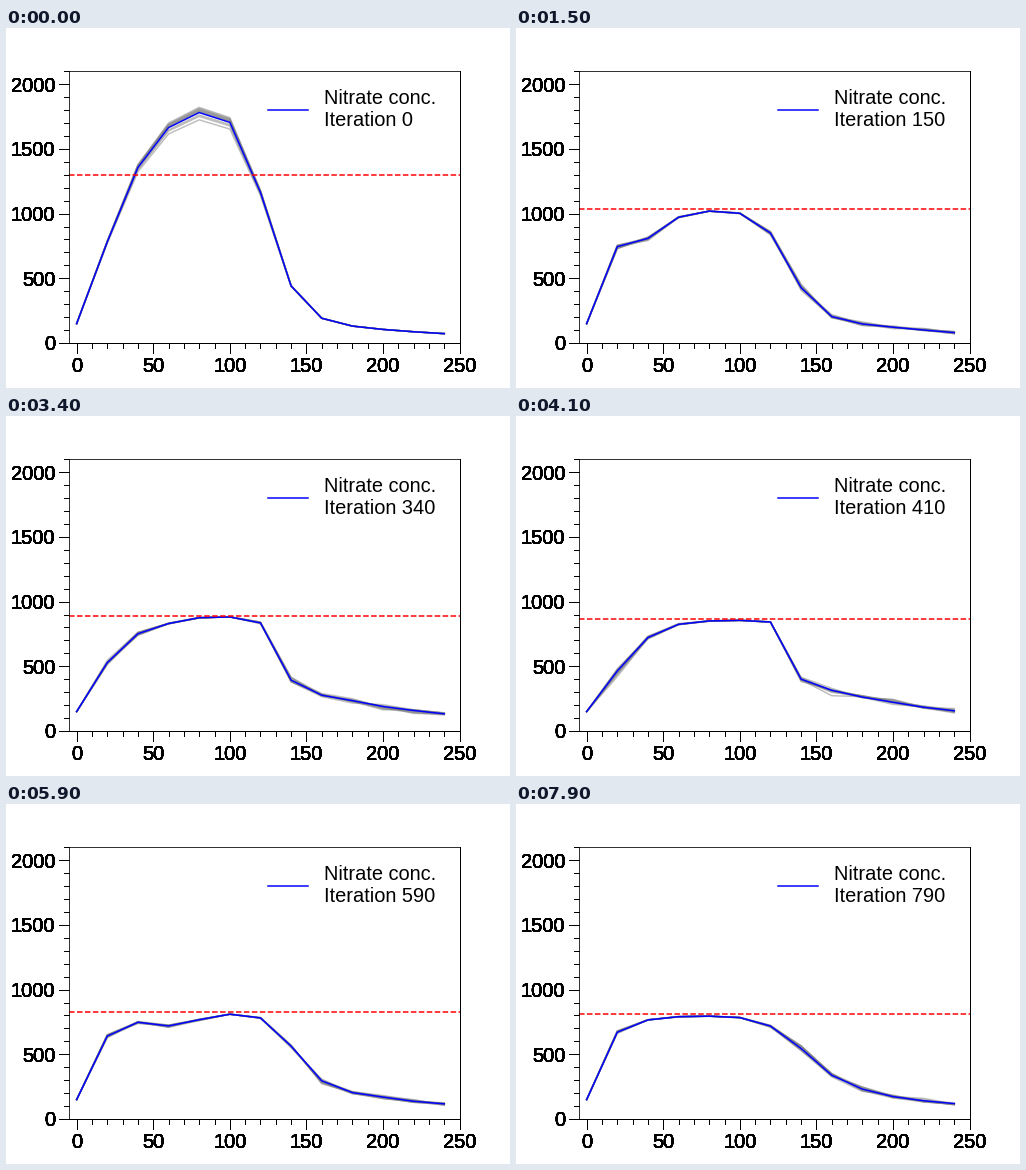
Recreate the animation shown at these times as a matplotlib script. Size 504 px wide and 360 px high, loop 8000 ms.

```python
import numpy as np
import matplotlib.pyplot as plt
from matplotlib.animation import FuncAnimation
from matplotlib.lines import Line2D
from matplotlib.markers import TICKDOWN, TICKLEFT

W, H, DPI = 504, 360, 72
FRAMES, STEP, MEMBERS = 80, 10, 10
SIZE, BASE = 20, 150
COLLAPSES = (6, 27, 48)

plt.rcParams.update({"font.family": "Liberation Sans", "font.size": SIZE})

x = np.arange(0, 241, 20)

# Curve character over time: rise scale, rise order, dip, fall centre, fall width, tail
CHARACTER = {
    0: (35, 1.4, 0, 123, 10, 0.08),
    15: (14.5, 1, 0.156, 131, 9, 0.17),
    41: (28.8, 1.55, 0, 130, 3, 0.37),
    51: (18, 1, 0.217, 141, 6, 0.33),
    66: (10.6, 0.7, 0, 140, 10, 0.27),
    79: (11.4, 0.85, 0, 140, 13, 0.3),
}


def limit(i):
    return 800 + 500 * np.exp(-i * STEP / 200)


def profile(i):
    """Steep rise to a plateau, a possible dip, then a fall into a slow tail."""
    scale, order, dip, mid, width, tail = (
        np.interp(i, list(CHARACTER), p) for p in zip(*CHARACTER.values()))
    peak = limit(i) * (0.99 if i else 1.44)
    rise = 1 - np.exp(-(x / scale) ** order)
    notch = dip * np.exp(-((x - 30 - 0.6 * i) / 18) ** 2)
    floor = np.minimum(tail * np.exp((160 - x) / 110), 1)
    fall = floor + (1 - floor) / (1 + np.exp((x - mid) / width))
    return (BASE + (peak - BASE) * rise - peak * notch) * fall


def vary(c, top, amount, rng, rows=()):
    """Scatter that fades out towards zero and towards the top."""
    noise = rng.normal(0, amount, (*rows, x.size))
    c = np.clip(c + noise * (top - c) * c / top, 3, top)
    c[..., 0] = BASE
    return c


def curves(i):
    """Best curve and the population around it."""
    rng = np.random.default_rng(100 + i)
    rows = (MEMBERS,)
    if i == 0:
        best = profile(0)
        gain = rng.triangular(-0.045, 0.012, 0.028, MEMBERS)[:, None]
        return best, best * (1 + gain * best / best.max())
    if i in COLLAPSES:
        best = BASE * np.exp(-x / 95)
        return best, vary(best, limit(i), 0.25, rng, rows)
    best = vary(profile(i), limit(i), 0.02, rng)
    return best, vary(best, limit(i), 0.06, rng, rows)


fig = plt.figure(figsize=(W / DPI, H / DPI), dpi=DPI, facecolor="white")
ax = fig.add_axes([0.125, 0.125, 0.775, 0.755])
ax.set(xlim=(-5, 250), ylim=(0, 2100), xticks=[], yticks=[])
ax.spines[["left", "top"]].set_linewidth(0.8)
ax.spines[["right", "bottom"]].set_linewidth(1)

x_text = ax.get_xaxis_text1_transform(13.5)
y_text = ax.get_yaxis_text1_transform(13.5)


def ticks(values, size, vertical):
    zeros = np.zeros(len(values))
    xy = (zeros, values) if vertical else (values, zeros)
    tr = ax.get_yaxis_transform() if vertical else ax.get_xaxis_transform()
    ax.plot(*xy, ls="none", marker=TICKLEFT if vertical else TICKDOWN, ms=size,
            mew=0.8, color="black", transform=tr, clip_on=False)


def label(value, pos, placement):
    tr, va, ha = placement
    ax.text(*pos, str(value), transform=tr, va=va, ha=ha)


# Stacked copies give ticks and labels their hard, heavy edges
for _ in range(14):
    for major, minor, end, vertical in ((50, 10, 250, False), (500, 100, 2100, True)):
        ticks(np.arange(0, end + 1, minor), 5, vertical)
        ticks(np.arange(0, end + 1, major), 10, vertical)
        for v in range(0, end + 1, major):
            label(v, (0, v) if vertical else (v, 0), y_text if vertical else x_text)
ax.set(xlim=(-5, 250), ylim=(0, 2100))

greys = [ax.plot([], [], color="gray", alpha=0.5, lw=1.5)[0] for _ in range(MEMBERS)]
blue, = ax.plot([], [], color="blue", lw=1.5)
red = ax.axhline(limit(0), color="red", ls="--", lw=1.5)

fig.add_artist(Line2D([262 / W, 302 / W], [1 - 82 / H] * 2, color="blue", lw=1.5))
fig.text(318 / W, 1 - 76 / H, "Nitrate conc.")
counter = fig.text(318 / W, 1 - 98 / H, "")


def draw(i):
    best, group = curves(i)
    for line, member in zip(greys, group):
        line.set_data(x, member)
    blue.set_data(x, best)
    red.set_ydata([limit(i)] * 2)
    counter.set_text(f"Iteration {i * STEP}")
    return [*greys, blue, red, counter]


anim = FuncAnimation(fig, draw, frames=FRAMES, interval=100, repeat=True,
                     repeat_delay=0, blit=False)
plt.show()
```
